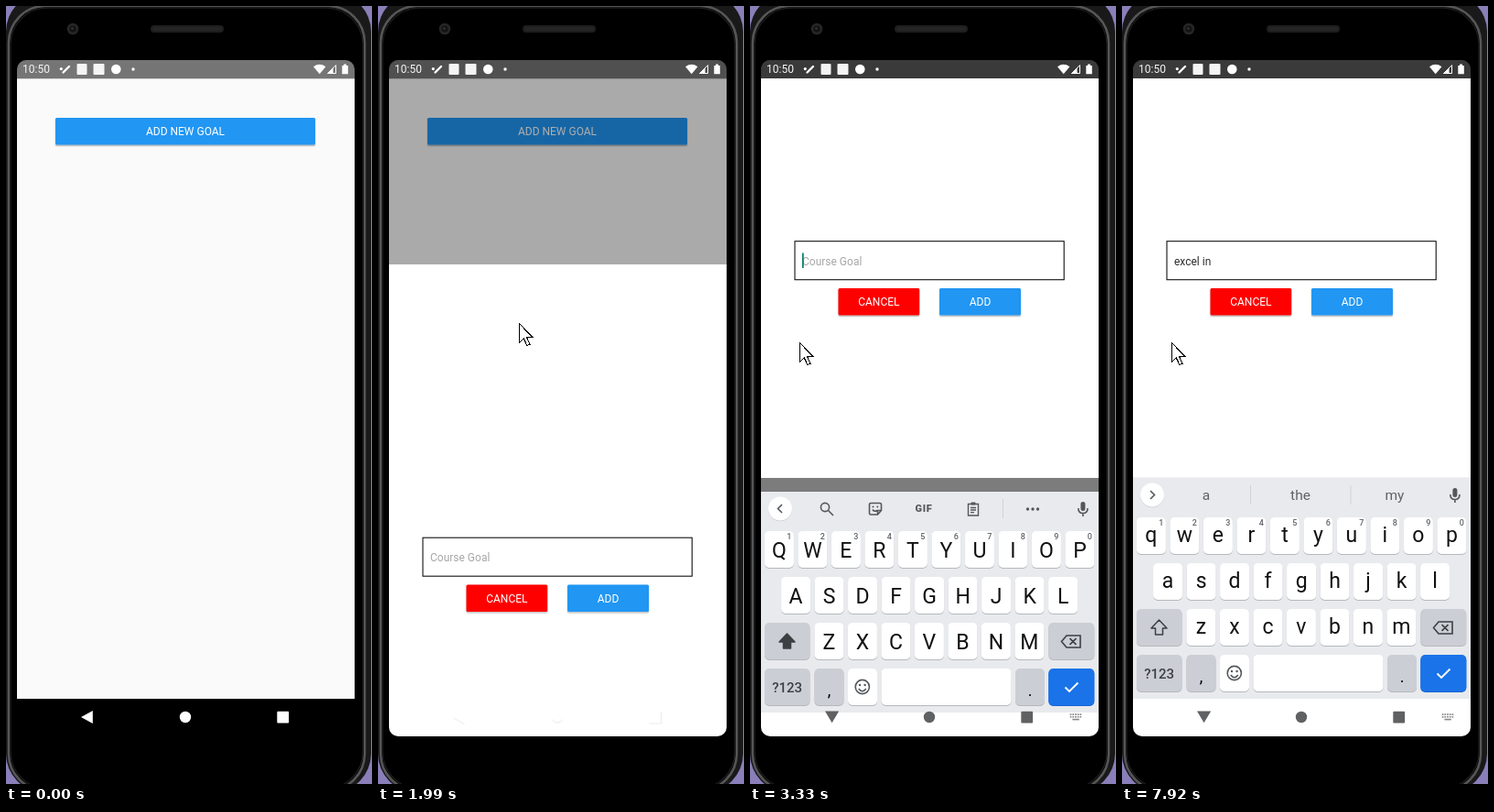
Recreate the animation shown at these times as an HTML page. Size 400 px wide and 849 px high, loop 8000 ms.

```html
<!DOCTYPE html>
<html lang="en">
<head>
<meta charset="utf-8">
<title>Add a goal</title>
<style>
html, body { margin: 0; width: 100%; height: 100%; overflow: hidden; background: #8a7fb9; }
svg { display: block; width: 100vw; height: 100vh; }
text { font-family: Roboto, "Noto Sans", sans-serif; font-size: 12px; white-space: pre; }
.mid { text-anchor: middle; }
.letter { font-size: 23px; fill: #111; }
.hint { font-size: 9px; fill: #5f6368; font-weight: 500; }
.word { font-size: 15.5px; fill: #5f6368; }
.line { fill: none; stroke: #54585c; stroke-width: 1.6; }
</style>
</head>
<body>
<svg id="stage" viewBox="0 0 400 849" preserveAspectRatio="none"></svg>
<script>
const LOOP = 8000;
const SLIDE = 1732, SLIDE_MS = 403, FOCUS = 2770, RESIZE = 3085, KEYS_MS = 390;
const LOWER = 5740, SUGGEST = 5990;
const LIFT = 120.5;

const clamp = v => Math.max(0, Math.min(1, v));
const within = (t, a, b) => t >= a && t < b;

const rect = (x, y, w, h, fill, r = 0, more = '') =>
  `<rect x="${x}" y="${y}" width="${w}" height="${h}" rx="${r}" fill="${fill}" ${more}/>`;
const circle = (x, y, r, fill, more = '') =>
  `<circle cx="${x}" cy="${y}" r="${r}" fill="${fill}" ${more}/>`;
const path = (d, more = '') => `<path d="${d}" ${more}/>`;
const label = (x, y, s, more = '') => `<text x="${x}" y="${y}" ${more}>${s}</text>`;
const group = (id, body, more = '') => `<g id="${id}" ${more}>${body}</g>`;

const button = (x, y, w, fill, s) =>
  rect(x - 1, y, w + 2, 32, '#000', 2.5, 'opacity=".06"') +
  rect(x, y + 1, w, 30, '#000', 2, 'opacity=".17"') +
  rect(x, y, w, 29.5, fill, 1.5) +
  label(x + w / 2, y + 19.4, s, 'class="mid" fill="#fff"');

function phone() {
  const rim = (x, y, w, c, sw) => rect(x, y, w, 856 - 2 * y, '#000', 40, `stroke="${c}" stroke-width="${sw}"`);
  return rect(0, 0, 400, 849, '#8a7fb9') +
    rect(0, -14, 399, 872, '#191919', 42) +
    rim(3, 0, 389, '#565656', 2.6) + rim(5, 2, 385, '#1c1c1c', 1.4) +
    circle(73, 25, 6.3, '#262626') + circle(73, 25, 3.6, '#121212') + circle(72.5, 24.5, 1.3, '#383838') +
    rect(158, 21, 80, 8, '#1e1e1e', 4) + rect(160, 23, 76, 4, '#252525', 2);
}

function statusIcons() {
  return label(18, 73.4, '10:50', 'fill="#f4f4f4"') +
    path('M62.5 72.5L69 66', 'stroke="#fff" stroke-width="2.4" stroke-linecap="round"') +
    circle(60.3, 68.6, 1.6, '#fff') +
    rect(77.5, 63, 11, 12, '#f4f4f4', 1) + rect(95.5, 63, 12, 12, '#f4f4f4', 1) +
    circle(120.3, 69, 5.3, '#fff') + circle(139, 69, 1.7, '#fff') +
    path('M336 66.2Q342.7 61.4 349.4 66.2L342.7 74.2Z', 'fill="#fff"') +
    path('M360.5 64.6V73.5H351.6Z', 'fill="none" stroke="#fff"') +
    path('M351 74L357.5 67.5V74Z', 'fill="#fff"') +
    path('M367.3 65H369V63.5H372V65H373.8V74.3H367.3Z', 'fill="#fff"');
}

function modal() {
  return '<rect id="sheet" x="12" y="79" width="369" height="718" fill="#fff"/>' +
    group('form',
      rect(49, 377.2, 294.2, 42, '#fff', 0, 'stroke="#111" stroke-width="1.1"') +
      label(57, 403, 'Course Goal', 'id="hint" fill="#a6a6a6"') +
      label(57, 403, '', 'id="typed" fill="#2b2b2b"') +
      '<rect id="under" x="57" y="404.6" height="1" fill="#333"/>' +
      '<rect id="caret" y="390" width="1.7" height="16.5" fill="#0a7d72"/>' +
      button(96.5, 428.5, 88.7, '#f00', 'CANCEL') +
      button(207, 428.5, 89, '#2196f3', 'ADD'));
}

function key(x, y, w, fill = '#fff', shade = '#b5b8bd') {
  return rect(x, y + 1, w, 40, shade, 5) + rect(x, y, w, 40, fill, 5);
}

function letterRow(chars, cx, y, hints) {
  return [...chars].map((c, i) => {
    const x = cx + 36.5 * i;
    return key(x - 16, y, 32) +
      label(x, y + 28.6, c, 'class="mid letter"') +
      (hints ? label(x + 11, y + 8.8, (i + 1) % 10, 'class="mid hint"') : '');
  }).join('');
}

function toolbar() {
  return group('tools',
    circle(82, 532, 4.6, 'none', 'class="line"') + path('M85.5 535.5L91 541', 'class="line"') +
    path('M132 527.5H142Q143.5 527.5 143.5 529V535.5L139.5 540H132Q130.5 540 130.5 538.5V529Q130.5 527.5 132 527.5ZM139.5 540V535.5H143.5M134 534.5Q136 537.5 139 535.5', 'class="line"') +
    circle(134.5, 531.5, 1, '#54585c') + circle(139.3, 531.5, 1, '#54585c') +
    label(190, 537.3, 'GIF', 'class="mid" fill="#54585c" style="font-size:11px;font-weight:900;letter-spacing:.7px"') +
    path('M238.5 528.5H249.5V541H238.5ZM241 532.5H247M241 535H247M241 537.6H245', 'class="line" style="stroke-width:1.4"') +
    rect(241.5, 526.5, 5, 3, '#54585c', 1) +
    rect(276, 523, 1, 21, '#d0d3d7') +
    [303.5, 309, 314.5].map(x => circle(x, 534, 1.7, '#54585c')).join('')) +
    group('words',
      rect(140, 523, 1, 21, '#d0d3d7') + rect(249.5, 523, 1, 21, '#d0d3d7') +
      [92, 195, 298].map(x => label(x, 539.2, '', 'class="mid word"')).join(''));
}

function keyboard() {
  const grey = '#cbced4';
  return rect(12, 515, 369, 242, '#e8eaed') + rect(12, 756, 369, 41, '#fff') +
    rect(12, 514, 369, 1, '#000', 0, 'opacity=".05"') +
    circle(33, 534.3, 13, '#c8cbd0') + circle(33, 533.5, 13, '#fff') +
    '<path id="chevron" class="line"/>' + toolbar() +
    rect(361.4, 526, 5, 10, '#54585c', 2.5) +
    path('M358.8 533Q358.8 538.5 363.9 538.5Q369 538.5 369 533M363.9 538.5V542', 'class="line"') +
    letterRow('QWERTYUIOP', 31.9, 558, true) +
    letterRow('ASDFGHJKL', 50.1, 608) +
    letterRow('ZXCVBNM', 86.4, 658) +
    key(16, 658, 49.5, grey) +
    path('M40.5 670L49 679H44.5V686H36.5V679H32Z', 'id="shift" stroke="#3c4043" stroke-width="1.5" stroke-linejoin="round"') +
    key(326.3, 658, 50, grey) +
    path('M346 672H361V685H346L340.5 678.5ZM349.5 675.2L356.5 681.8M356.5 675.2L349.5 681.8', 'class="line" style="stroke:#3c4043"') +
    key(16, 708, 49.5, grey) + label(40.7, 733.6, '?123', 'class="mid" fill="#3c4043" style="font-size:15px;font-weight:500"') +
    key(70.5, 708, 32, grey) + label(86.5, 738, ',', 'class="mid" style="font-size:18px"') +
    key(107, 708, 32) + circle(122.8, 728, 7.6, 'none', 'class="line"') +
    circle(120, 726, 1.2, '#54585c') + circle(125.6, 726, 1.2, '#54585c') +
    path('M118.8 730Q122.8 735.5 126.8 730', 'class="line"') +
    key(143.5, 708, 142) +
    key(290, 708, 32, grey) + label(306, 738, '.', 'class="mid" style="font-size:18px"') +
    key(326.3, 708, 50, '#1a73e8', '#1967d2') +
    path('M344.5 728.5L349 733L358.5 723.5', 'fill="none" stroke="#fff" stroke-width="1.9"');
}

function navIcons() {
  const dots = [0, 1].map(r => [0, 1, 2, 3, 4].map(c =>
    rect(349.7 + c * 2.7, 772.2 + r * 2.7, 1.7, 1.7, 'currentColor')).join('')).join('');
  return group('nav',
    '<path id="back" fill="currentColor"/>' +
    circle(196, 776, 6.2, 'currentColor') +
    rect(296.3, 769.8, 12.8, 12.8, 'currentColor', 1) +
    group('kbIcon', dots + rect(352.4, 777.8, 7.4, 1.6, 'currentColor'))) +
    path('M82.5 777L94.5 783.5M190 778.5Q196 786 202 778.5M296.5 783H309.5V770', 'id="navShade" fill="none" stroke="#eaeaea"');
}

const stage = document.getElementById('stage');
stage.innerHTML =
  '<clipPath id="glass"><rect x="12" y="59" width="369" height="738" rx="10"/></clipPath>' +
  phone() +
  group('screen',
    rect(12, 79, 369, 677, '#fafafa') + rect(12, 59, 369, 20.3, '#757575') +
    button(54, 122, 284, '#2196f3', 'ADD NEW GOAL') +
    rect(54, 122, 284, 29.5, '#000', 1.5, 'id="press"') +
    rect(12, 59, 369, 738, '#000', 0, 'id="dim"') +
    group('modal', modal()) +
    rect(12, 756, 369, 41, '#000', 0, 'id="navBar"') +
    group('keys', keyboard()) + navIcons() + statusIcons(),
    'clip-path="url(#glass)"') +
  circle(0, 0, 14.5, '#000', 'id="tap" fill-opacity=".2" stroke="#000" stroke-opacity=".3"') +
  path('M.5.5V21.5L5.3 17L8.8 24.5L12 23.2L8.6 15.8H15.2Z',
    'id="pointer" fill="#fff" stroke="#000" stroke-width="1.1" shape-rendering="crispEdges"');

const el = {};
stage.querySelectorAll('[id]').forEach(n => el[n.id] = n);
const letters = [...stage.querySelectorAll('.letter')];
const words = [...stage.querySelectorAll('.word')];
const caps = letters.map(n => n.textContent);

const set = (n, attrs) => { for (const k in attrs) n.setAttribute(k, attrs[k]); };
const show = (n, on) => n.style.display = on ? '' : 'none';
const last = (list, t) => list.reduce((found, item) => item[0] <= t ? item : found, list[0]);

// [time, x, y] of the pointer tip
const trail = [
  [520, 297, 90], [750, 165, 135], [950, 80, 160], [1200, 112, 140], [1560, 114, 142],
  [1840, 141, 221], [2150, 167, 478], [2220, 168, 482], [2450, 163, 391],
  [2840, 163, 391], [3000, 146, 395], [3160, 54, 367]
];
// [time, text, start of the underlined word]
const typing = [
  [0, '', 0], [LOWER, 'e', 0], [6230, 'ex', 0], [6380, 'exc', 0], [6530, 'exce', 0],
  [6700, 'excel', 0], [6850, 'excel ', 6], [7000, 'excel i', 6], [7230, 'excel in ', 6], [7460, 'excel in ', 9]
];
const offers = [
  [SUGGEST, 'e enjoy even'], [6230, 'ex excited exam'], [6380, 'exc except excel'],
  [6530, 'exce excel excellent'], [6700, 'excel excels excellent'], [6850, 'at in and'],
  [7080, 'i in is'], [7230, 'in into interested'], [7460, 'a the my']
];
const blinks = [[0, 0], [FOCUS, 1], [3380, 0], [3880, 1], [4410, 0], [4870, 1], [5340, 0], [LOWER, 1], [7920, 0]];

function pointerAt(t) {
  const i = trail.findIndex(p => p[0] > t);
  if (i < 0) return trail[trail.length - 1].slice(1);
  if (!i) return null;
  const [a, b] = [trail[i - 1], trail[i]];
  const u = (t - a[0]) / (b[0] - a[0]);
  return [a[1] + (b[1] - a[1]) * u, a[2] + (b[2] - a[2]) * u];
}

function drawPointer(t) {
  const p = pointerAt(t);
  const tapped = within(t, 1230, 1380) || within(t, 2600, FOCUS);
  show(el.pointer, p);
  show(el.tap, tapped);
  if (!p) return;
  const move = { transform: `translate(${Math.round(p[0])} ${Math.round(p[1])})` };
  set(el.pointer, move);
  set(el.tap, move);
}

function drawModal(t) {
  const u = clamp((t - SLIDE) / SLIDE_MS);
  const eased = .5 - Math.cos(u * Math.PI) / 2;
  const raised = t >= RESIZE;
  set(el.press, { opacity: .12 * clamp((t - 1380) / 120) * clamp((SLIDE - t) / 180) });
  set(el.dim, { opacity: u * .5 });
  show(el.modal, u > 0);
  set(el.modal, { transform: `translate(0 ${Math.round(718 * (1 - eased))})` });
  set(el.sheet, { height: raised ? 436 : 718 });
  set(el.form, { transform: `translate(0 ${raised ? -LIFT : 0})` });
}

function drawInput(t) {
  const [, text, from] = last(typing, t);
  el.typed.textContent = text;
  show(el.hint, !text);
  const width = n => n ? el.typed.getSubStringLength(0, n) : 0;
  const end = text.trimEnd().length;
  const x = width(from);
  set(el.under, { x: 57 + x, width: Math.max(0, width(end) - x) });
  set(el.caret, { x: 57 + width(text.length) });
  show(el.caret, last(blinks, t)[1]);
}

function drawKeys(t) {
  const u = clamp((t - RESIZE) / KEYS_MS);
  const lower = t >= LOWER, offering = t >= SUGGEST;
  show(el.keys, u > 0);
  set(el.keys, { transform: `translate(0 ${Math.round(107 * (1 - u) ** 2)})`, opacity: clamp(u * 3.7) });
  letters.forEach((n, i) => {
    n.textContent = lower ? caps[i].toLowerCase() : caps[i];
    set(n, { dy: lower ? -1.2 : 0 });
  });
  set(el.shift, { fill: lower ? 'none' : '#3c4043' });
  set(el.chevron, { d: offering ? 'M31 529L35.5 533.5L31 538' : 'M35 529L30.5 533.5L35 538' });
  show(el.tools, !offering);
  show(el.words, offering);
  const offer = last(offers, t)[1].split(' ');
  words.forEach((n, i) => n.textContent = offer[i]);
}

function drawNav(t) {
  const up = t >= RESIZE;
  const sliding = within(t, SLIDE + 60, SLIDE + SLIDE_MS);
  show(el.navBar, !sliding);
  show(el.navShade, sliding);
  el.nav.style.color = !up ? '#fff' : t < 3260 ? '#858585' : '#5f6163';
  set(el.back, { d: t < 3260 ? 'M82 776L94.8 769V783Z' : 'M82 769.5H97.2L89.6 782.3Z' });
  show(el.kbIcon, t >= FOCUS);
  set(el.kbIcon, { opacity: up ? .75 : 1 });
}

function draw(t) {
  drawModal(t);
  drawInput(t);
  drawKeys(t);
  drawNav(t);
  drawPointer(t);
}

const start = performance.now();
function tick() {
  draw((performance.now() - start) % LOOP);
  requestAnimationFrame(tick);
}
tick();
</script>
</body>
</html>
```
